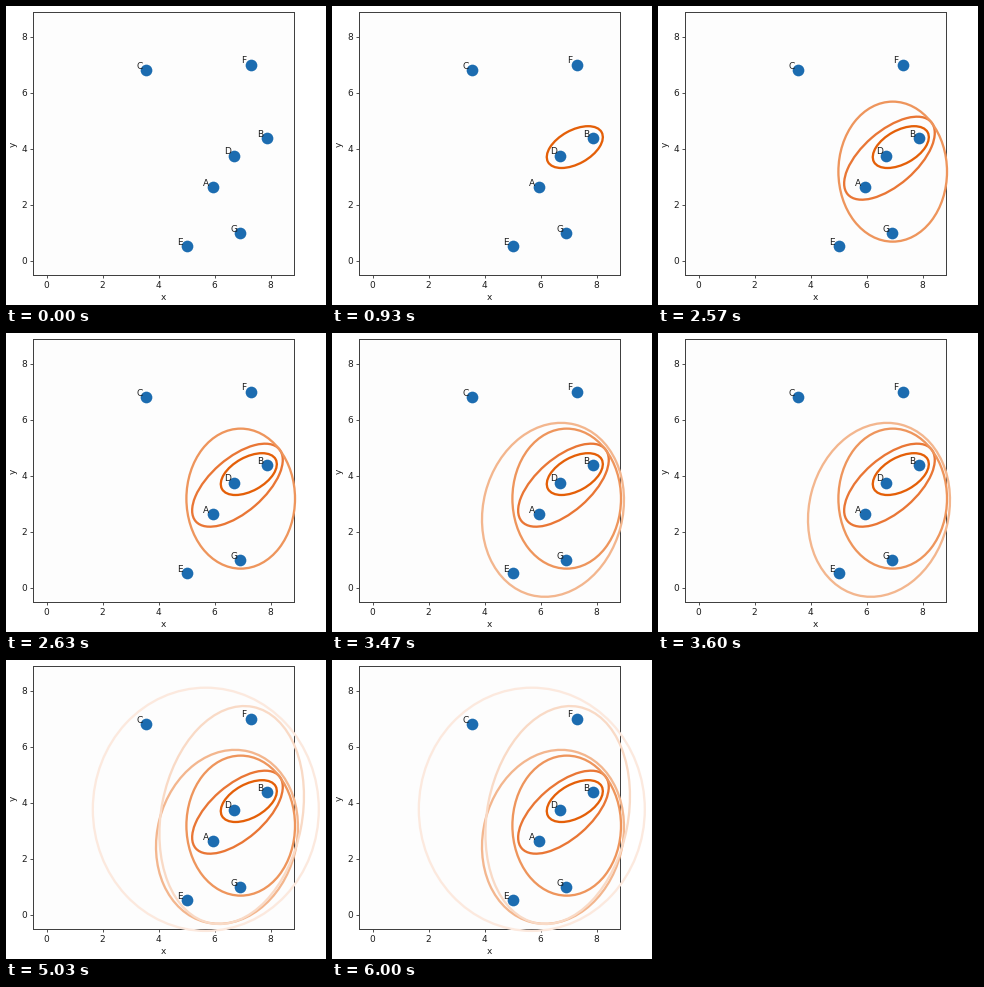
These frames come from a looping animation (320x299 px, 6030 ms). A matplotlib script:

```python
import matplotlib.pyplot as plt
from matplotlib.animation import FuncAnimation
from matplotlib.patches import Ellipse

W, H, DPI = 320, 299, 64
PX = 72 / DPI                    # points per pixel
UNIT = 28                        # pixels per data unit
X0, Y0 = 40.5, 254.5             # pixel position of the data origin
LEFT, RIGHT, TOP, BOTTOM = 27.4, 288.4, 5.6, 268.6
STEP, FRAMES = 30, 201
INK = "#404040"

POINTS = {
    "A": (5.94, 2.62), "B": (7.86, 4.38), "C": (3.57, 6.79), "D": (6.70, 3.74),
    "E": (5.02, 0.51), "F": (7.30, 7.00), "G": (6.91, 0.97),
}

# start time (ms), centre, major axis, minor axis, angle, colour
CLUSTERS = [
    (930, (7.225, 4.050), 2.190, 1.200, 29, "#e45f08"),
    (1770, (6.820, 3.654), 3.943, 1.929, 40.9, "#e97635"),
    (2530, (6.936, 3.174), 5.000, 3.879, 90, "#ee955c"),
    (3470, (6.446, 2.774), 6.286, 4.979, 75.5, "#f3b68e"),
    (4270, (6.614, 3.552), 7.871, 5.029, 78.9, "#f9dac6"),
    (5030, (5.690, 3.757), 8.686, 8.071, 90, "#fce9de"),
]

plt.rcParams.update({"font.family": "DejaVu Sans", "font.size": 9 * PX,
                     "text.color": "#1c1c1c"})

fig = plt.figure(figsize=(W / DPI, H / DPI), dpi=DPI, facecolor="white")
ax = fig.add_axes([LEFT / W, 1 - BOTTOM / H, (RIGHT - LEFT) / W, (BOTTOM - TOP) / H],
                  facecolor="#fdfdfd")
ax.set_xlim((LEFT - X0) / UNIT, (RIGHT - X0) / UNIT)
ax.set_ylim((Y0 - BOTTOM) / UNIT, (Y0 - TOP) / UNIT)
ax.set_xticks(range(0, 9, 2))
ax.set_yticks(range(0, 9, 2))
ax.tick_params(length=3 * PX, width=0.9 * PX, pad=3 * PX, color=INK,
               labelcolor="#1c1c1c")
for spine in ax.spines.values():
    spine.set(linewidth=PX, color=INK)

fig.text(157.7 / W, 1 - 291 / H, "x", ha="center", va="center")
fig.text(7 / W, 1 - 138 / H, "y", ha="center", va="center", rotation=90)

xs, ys = zip(*POINTS.values())
ax.plot(xs, ys, "o", ms=11.7 * PX, mew=0, color="#1c6cb0", zorder=3, snap=False)
for name, pos in POINTS.items():
    ax.annotate(name, pos, xytext=(-9.7 * PX, 1.3 * PX), textcoords="offset points",
                ha="left", va="baseline", zorder=4)

rings = []
for start, centre, major, minor, angle, color in CLUSTERS:
    ring = Ellipse(centre, major, minor, angle=angle, fill=False, ec=color,
                   lw=2.3 * PX, zorder=5, clip_on=False, visible=False)
    rings.append((start // STEP, ax.add_patch(ring)))


def update(i):
    for first, ring in rings:
        ring.set_visible(i >= first)
    return [ring for _, ring in rings]


anim = FuncAnimation(fig, update, frames=FRAMES, init_func=lambda: update(0),
                     interval=STEP, repeat=True, repeat_delay=0, blit=False)
plt.show()
```
